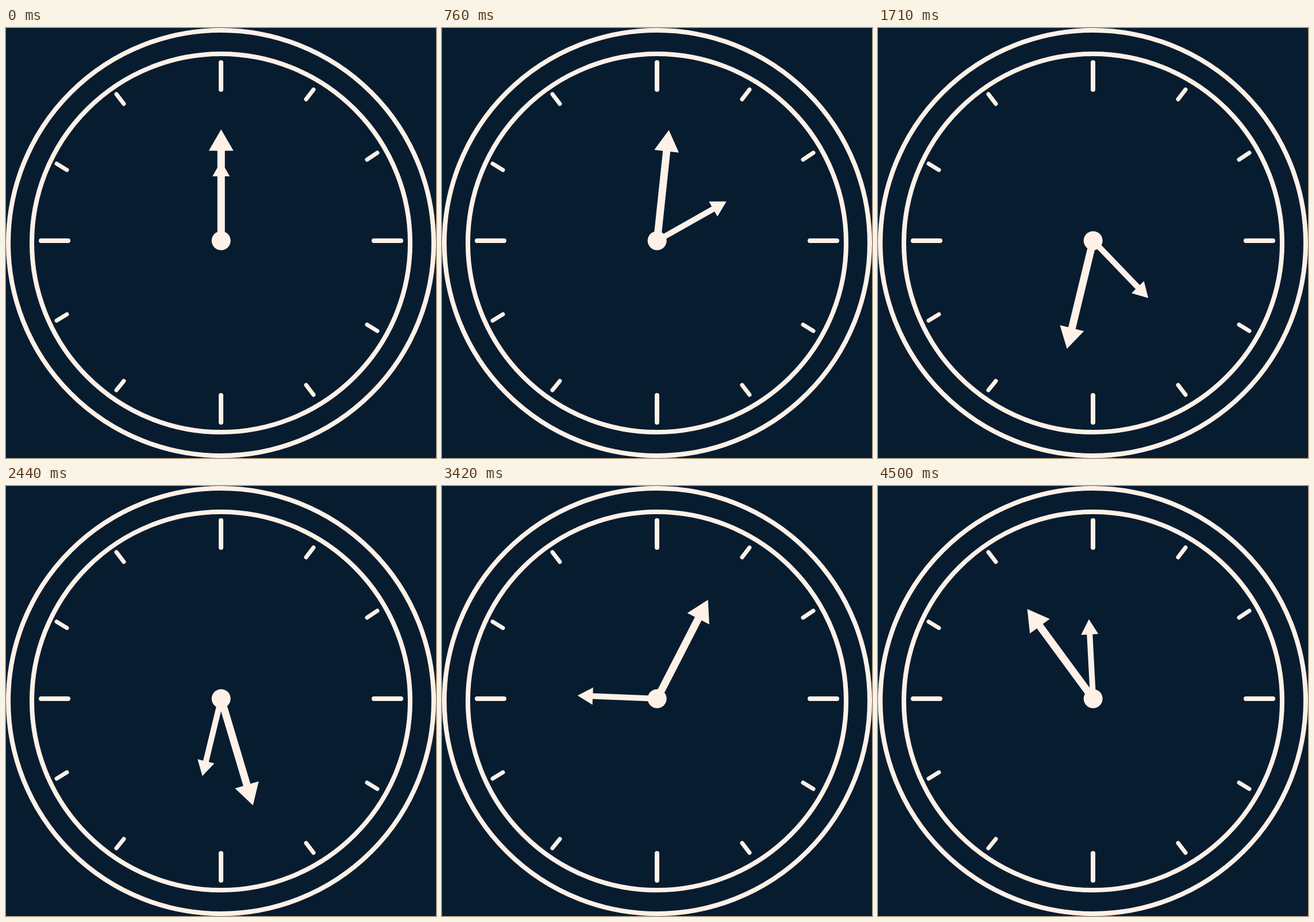
Animation of 748x748 px, one loop 4.53 s. Source, as an HTML page:

```html
<!DOCTYPE html>
<html lang="en">
<head>
<meta charset="utf-8">
<title>Clock</title>
<style>
  html, body { margin: 0; width: 100%; height: 100%; overflow: hidden; background: #081c30; }
  svg { display: block; width: 100%; height: 100%; }
  .line { fill: none; stroke: #fff1e7; stroke-width: 8; stroke-linecap: round; }
  .thin { stroke-width: 7; }
  .solid { fill: #fff1e7; }
</style>
</head>
<body>
<svg viewBox="0 0 748 748">
  <g class="line">
    <circle cx="374" cy="374" r="370"/>
    <circle cx="374" cy="374" r="329"/>
    <path d="M374 60V107M374 639V686M61 370H108M640 370H687"/>
    <path class="thin" d="M535 107L522 124M646 217L628 229M646 527L628 516M535 638L522 621
      M192 630L205 614M88 509L106 498M88 236L106 247M192 115L205 132"/>
  </g>
  <g class="solid" transform="translate(374.2 370)">
    <path id="hour" d="M-5 0V-112H-15L0-138.5L15-112H5V0Z"/>
    <path id="minute" d="M-6.5 0V-156.5H-21.5L0-193.5L21.5-156.5H6.5V0Z"/>
    <circle r="16.5"/>
  </g>
</svg>
<script>
  const STEPS = 119, LOOP = 4530;
  const GROUP = 190, STARTS = [0, 30, 60, 130, 160]; // tick times within each group of five
  const hour = document.getElementById("hour");
  const minute = document.getElementById("minute");
  const turn = (hand, degrees) => hand.setAttribute("transform", `rotate(${degrees % 360})`);

  function stepAt(ms) {
    const rest = ms % GROUP;
    return Math.floor(ms / GROUP) * 5 + STARTS.filter(s => s <= rest).length - 1;
  }

  function draw(ms) {
    const angle = stepAt(ms % LOOP) * 360 / STEPS;
    turn(hour, angle);
    turn(minute, angle * 12);
  }

  const begin = performance.now();
  function frame() {
    draw(performance.now() - begin);
    requestAnimationFrame(frame);
  }
  frame();
</script>
</body>
</html>
```
